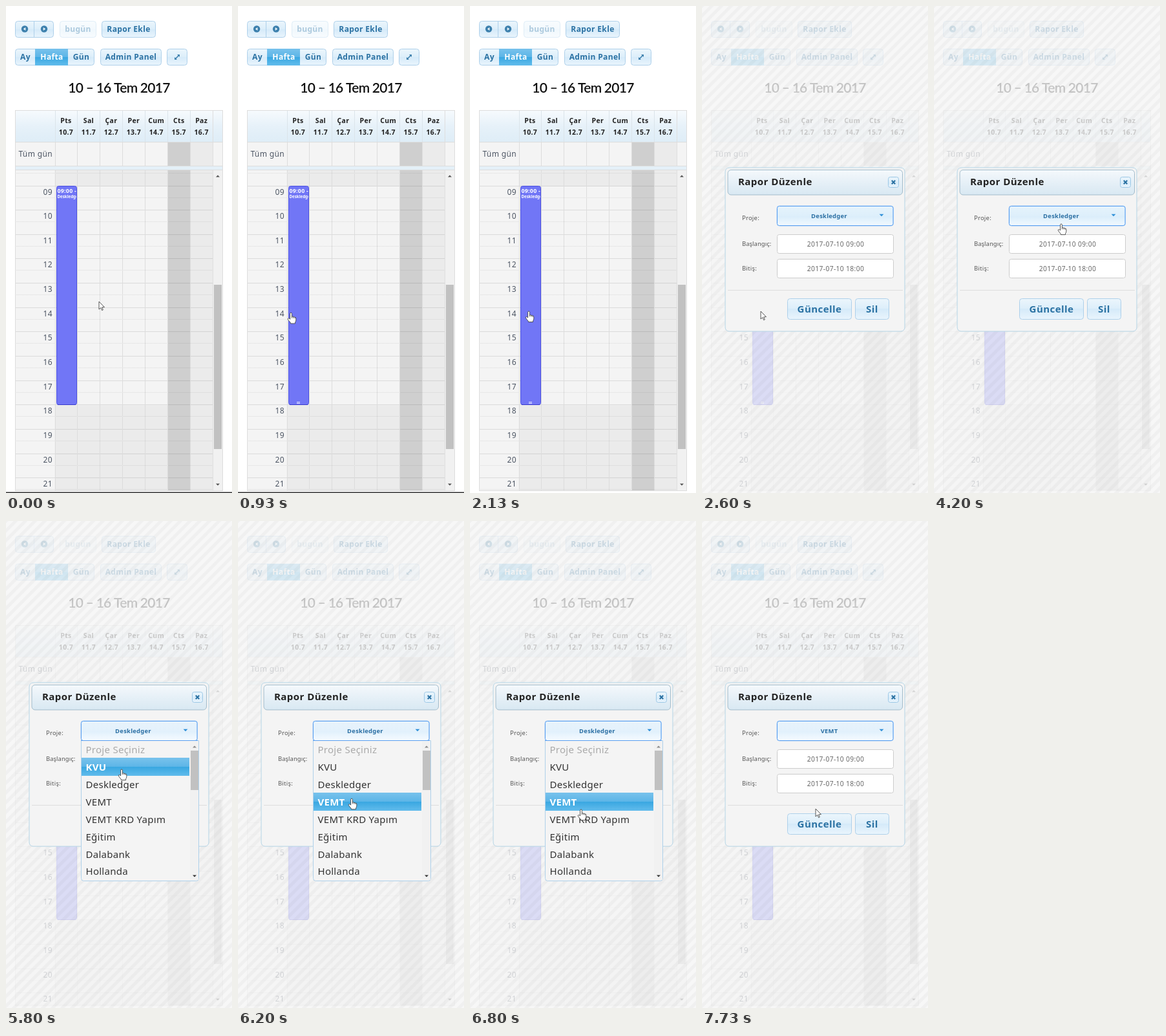
Write an HTML page with a canvas that moves like this. It is 350 px wide and 753 px high and loops after 8 s.

```html
<!DOCTYPE html>
<html lang="tr">
<head>
<meta charset="utf-8">
<title>Haftalık takvim</title>
<style>
html, body { margin: 0; width: 100%; height: 100%; overflow: hidden; background: #fff; }
canvas { display: block; width: 350px; height: 753px; }
</style>
</head>
<body>
<canvas id="stage"></canvas>
<script>
const W = 350, H = 753, LOOP = 8000, TICK = 1000 / 15;
const canvas = document.getElementById('stage');
const ctx = canvas.getContext('2d');
const dpr = window.devicePixelRatio || 1;
canvas.width = W * dpr;
canvas.height = H * dpr;
ctx.scale(dpr, dpr);

const SANS = '"Noto Sans", "Open Sans", sans-serif';
const PROJECT = 'Deskledger';
const ITEMS = ['Proje Seçiniz', 'KVU', PROJECT, 'VEMT', 'VEMT KRD Yapım', 'Eğitim', 'Dalabank', 'Hollanda'];
const DAYS = ['Pts', 'Sal', 'Çar', 'Per', 'Cum', 'Cts', 'Paz'];
const COL0 = 75.5, COLW = 34.95, HOUR = 37.65, NINE = 278.5;
const ROW0 = 340.5, ROWH = 26.85;
const T = { line: 2130, dialog: 2600, leave: 2865, press: 4730, open: 5200, pick: 7730 };

const GLASS = [[0, '#ecf6fc'], [.5, '#dceefa'], [.5, '#d5eaf9'], [1, '#eaf5fd']];
const FOCUS = [[0, '#e6f3fc'], [.5, '#ddeffb'], [.5, '#d9edfb'], [1, '#f2f9fe']];
const PRESS = [[0, '#e8f3fb'], [.5, '#e3f1fc'], [.5, '#e0f0fc'], [1, '#f6fbff']];
const LIT = [[0, '#78c2ec'], [.5, '#5cb5e7'], [.5, '#39a7e1'], [1, '#62bcec']];
const SOFT = [[0, '#f6fafd'], [.5, '#e6f1f9'], [1, '#deedf7']];

// Pointer path: time, x, y
const PATH = [
  [0, 144, 457], [600, 66, 473], [867, 80, 474], [1133, 94, 476], [1267, 94, 476],
  [1467, 91, 472], [2800, 91, 472], [3667, 205, 362], [3733, 206, 346], [4000, 206, 346],
  [4200, 197, 337], [4333, 201, 333], [4400, 201, 333], [4467, 202, 332], [5467, 202, 332],
  [5800, 179, 384], [6333, 175, 437], [6800, 172, 446], [7000, 175, 447.5],
  [7267, 175, 447.5], [7333, 176, 445], [LOOP, 176, 445]
];

function pointer(t) {
  let i = 1;
  while (i < PATH.length - 1 && PATH[i][0] < t) i++;
  const [t0, x0, y0] = PATH[i - 1], [t1, x1, y1] = PATH[i];
  const p = Math.min(1, Math.max(0, (t - t0) / (t1 - t0)));
  const e = p * p * (3 - 2 * p);
  return { x: Math.round(x0 + (x1 - x0) * e), y: y0 + (y1 - y0) * e };
}

const inside = (p, x0, y0, x1, y1) => p.x >= x0 && p.x < x1 && p.y >= y0 && p.y < y1;

function rect(x, y, w, h, fill) {
  ctx.fillStyle = fill;
  ctx.fillRect(x, y, w, h);
}

function line(x0, y0, x1, y1, color, dash = []) {
  ctx.strokeStyle = color;
  ctx.lineWidth = 1;
  ctx.setLineDash(dash);
  ctx.beginPath();
  ctx.moveTo(x0, y0);
  ctx.lineTo(x1, y1);
  ctx.stroke();
  ctx.setLineDash([]);
}

function grad(y, h, stops) {
  const g = ctx.createLinearGradient(0, y, 0, y + h);
  for (const [at, color] of stops) g.addColorStop(at, color);
  return g;
}

function box(x, y, w, h, r, fill, border) {
  ctx.beginPath();
  ctx.roundRect(x + .5, y + .5, w - 1, h - 1, r);
  ctx.fillStyle = Array.isArray(fill) ? grad(y, h, fill) : fill;
  ctx.fill();
  ctx.strokeStyle = border;
  ctx.lineWidth = 1;
  ctx.stroke();
}

// y is the middle of the capitals
function text(s, x, y, size, color, weight = 400, align = 'left', space = .03, family = SANS) {
  ctx.font = `${weight} ${size}px ${family}`;
  ctx.letterSpacing = `${(space * size).toFixed(2)}px`;
  ctx.textAlign = align;
  ctx.fillStyle = color;
  ctx.fillText(s, x, y + size * .36);
}

function poly(points, fill) {
  ctx.beginPath();
  points.forEach(([x, y]) => ctx.lineTo(x, y));
  ctx.closePath();
  ctx.fillStyle = fill;
  ctx.fill();
}

function caret(x, y, w, dir, color) {
  poly([[x - w, y - dir * w / 2], [x + w, y - dir * w / 2], [x, y + dir * w / 2]], color);
}

function button(label, x, y, w, h, size = 12) {
  box(x, y, w, h, 4, GLASS, '#aed0ea');
  text(label, x + w / 2, y + h / 2, size, '#2b72a3', 700, 'center');
}

function roundArrow(x, y, dir) {
  ctx.beginPath();
  ctx.arc(x, y, 5.2, 0, 7);
  ctx.fillStyle = '#3d80ad';
  ctx.fill();
  poly([[x + 2.2 * dir, y], [x - 1.3 * dir, y - 2.6], [x - 1.3 * dir, y + 2.6]], '#eef7fd');
}

function toolbar() {
  box(14, 23, 60, 26, 4, GLASS, '#aed0ea');
  line(43.5, 23, 43.5, 49, '#aed0ea');
  roundArrow(29, 35.5, -1);
  roundArrow(59, 35.5, 1);
  ctx.globalAlpha = .35;
  button('bugün', 83, 23, 57, 26);
  ctx.globalAlpha = 1;
  button('Rapor Ekle', 148, 23, 84, 26);

  box(14, 66, 123, 26, 4, GLASS, '#aed0ea');
  rect(45, 66, 51, 26, grad(66, 26, LIT));
  text('Ay', 30, 79, 12, '#2b72a3', 700, 'center');
  text('Hafta', 71, 79, 12, '#fff', 700, 'center');
  text('Gün', 116.5, 79, 12, '#2b72a3', 700, 'center');
  button('Admin Panel', 146, 66, 95, 26);
  box(249, 66, 32, 26, 4, GLASS, '#aed0ea');
  ctx.lineWidth = 1.6;
  ctx.strokeStyle = '#3d80ad';
  ctx.beginPath();
  ctx.moveTo(262.5, 81.5);
  ctx.lineTo(267.5, 76.5);
  ctx.stroke();
  poly([[265, 75], [269, 75], [269, 79]], '#3d80ad');
  poly([[261, 79], [261, 83], [265, 83]], '#3d80ad');

  text('10 – 16 Tem 2017', 175, 126.5, 21, '#111', 600, 'center', -.035, 'Lato, sans-serif');
}

function calendar() {
  const right = COL0 + 7 * COLW, end = NINE + 9 * HOUR;
  rect(14, 162, 322, 49, grad(162, 49, SOFT));
  rect(14, 211, 322, 538, '#f4f4f4');
  rect(COL0, 254, right - COL0, NINE - 254, '#ebebeb');
  rect(COL0, end, right - COL0, 749 - end, '#ebebeb');
  rect(COL0 + 5 * COLW, 211, COLW, 538, '#cfcfcf');
  rect(COL0 + 6 * COLW, 211, COLW, 538, '#ebebeb');

  for (let h = 8; h <= 21; h++) {
    const y = Math.round(NINE + (h - 9) * HOUR) - .5;
    if (h > 8) {
      line(14, y, right, y, 'rgba(0,0,0,.1)');
      text(String(h).padStart(2, '0'), 72, y + 9.5, 12, '#4c5563', 400, 'right');
    }
    const half = Math.round(y + HOUR / 2) - .5;
    if (half < 749) line(14, half, right, half, 'rgba(0,0,0,.1)', [1, 1]);
  }

  DAYS.forEach((day, i) => {
    const x = COL0 + i * COLW, mid = x + COLW / 2;
    line(Math.round(x) + .5, 162, Math.round(x) + .5, 211, '#dbe4ea');
    line(Math.round(x) + .5, 211, Math.round(x) + .5, 749, '#dcdcdc');
    text(day, mid, 177.5, 10.5, '#222', 700, 'center');
    text(`${10 + i}.7`, mid, 195, 10.5, '#222', 700, 'center');
  });
  line(Math.round(right) + .5, 162, Math.round(right) + .5, 749, '#dedede');

  text('Tüm gün', 72, 228.5, 12, '#4c5563', 400, 'right');
  line(14, 210.5, 336, 210.5, '#dddddd');
  rect(14, 248, 322, 6, '#e4f0f8');
  line(14, 247.5, 336, 247.5, '#dddddd');
  line(14, 253.5, 336, 253.5, '#dddddd');

  rect(321, 254, 14, 495, '#f1f1f1');
  rect(322, 431, 12, 254, '#c1c1c1');
  caret(328, 263, 3, -1, '#505050');
  caret(328, 740, 3, 1, '#505050');
  ctx.strokeStyle = '#dddddd';
  ctx.strokeRect(14.5, 161.5, 321, 588);
}

function eventBlock(handle) {
  box(78, 278, 32, 339, 3, '#7176f6', '#4a4fe2');
  line(80, 616.5, 108, 616.5, '#3a3ccc');
  ctx.save();
  ctx.beginPath();
  ctx.rect(78, 278, 31, 339);
  ctx.clip();
  text('09:00 - 18:00', 79.5, 285.5, 8.8, '#fff', 600);
  text(PROJECT, 79.5, 295, 6.2, '#fff', 700, 'left', 0);
  ctx.restore();
  if (handle) {
    rect(91, 612, 5, 1, '#e8e8ff');
    rect(91, 614, 5, 1, '#e8e8ff');
  }
}

function overlay() {
  rect(0, 0, W, H, 'rgba(246,246,246,.8)');
  ctx.strokeStyle = 'rgba(0,0,0,.028)';
  ctx.lineWidth = 5.3;
  ctx.beginPath();
  for (let x = -H; x < W; x += 15) {
    ctx.moveTo(x - 5, H + 5);
    ctx.lineTo(x + H + 5, -5);
  }
  ctx.stroke();
}

function input(value, y) {
  box(116, y, 181, 30, 3, '#fff', '#cccccc');
  text(value, 207, y + 15, 10.2, '#666', 400, 'center', .04);
}

function dialog(t) {
  box(35.5, 249.5, 279, 254, 6, '#f4f4f4', '#b5d5e6');
  box(39.5, 253, 271.5, 39.5, 5, [[0, '#f5f9fc'], [.5, '#e6f0f7'], [1, '#d8e8f2']], '#a3bccb');
  text('Rapor Düzenle', 56, 272, 15, '#222', 700);
  box(288, 264, 17, 17, 3, GLASS, '#9cc8e6');
  ctx.strokeStyle = '#2b72a3';
  ctx.lineWidth = 2.2;
  ctx.beginPath();
  ctx.moveTo(293.8, 269.8);
  ctx.lineTo(299.2, 275.2);
  ctx.moveTo(299.2, 269.8);
  ctx.lineTo(293.8, 275.2);
  ctx.stroke();

  text('Proje:', 62, 327.5, 9.4, '#555');
  text('Başlangıç:', 62, 367.5, 9.4, '#555', 400, 'left', .01);
  text('Bitiş:', 62, 406, 9.4, '#555');

  box(115.5, 308.5, 181.5, 32, 4, '#c4dff9', '#b4d5f8');
  box(116, 309, 180.5, 31, 3, t < T.press ? FOCUS : PRESS, '#5a9ff0');
  text(t < T.pick ? PROJECT : ITEMS[3], 197, 325, 9.4, '#2b6fa3', 700, 'center');
  caret(278, 323.5, 3.4, 1, '#2f8fd8');

  input('2017-07-10 09:00', 353);
  input('2017-07-10 18:00', 391);
  line(40, 439.5, 311, 439.5, '#dddddd');
  button('Güncelle', 132, 452, 100, 33, 15);
  button('Sil', 237, 452, 53, 33, 15);
}

function menu(p) {
  const active = p.y < ROW0 + ROWH ? 2 : Math.floor((p.y - ROW0) / ROWH);
  box(116, 339, 183, 218, [0, 0, 4, 4], '#f4f4f4', '#aed0ea');
  line(116, 339.5, 297, 339.5, '#5a9ff0');
  ITEMS.forEach((name, i) => {
    const y = ROW0 + i * ROWH, on = i === active;
    if (on) rect(117, Math.round(y) - 1, 167, 28, grad(y - 1, 28, LIT));
    text(name, 123.5, y + 13.5, 15, on ? '#fff' : i ? '#333' : '#aaa', on ? 700 : 400, 'left', .018);
  });
  rect(285, 341, 13, 214, '#f1f1f1');
  rect(286, 355, 12, 61, '#c1c1c1');
  caret(292, 349, 3, -1, '#8a8a8a');
  caret(292, 549, 3, 1, '#303030');
}

const ARROW = new Path2D('M0 0V12L2.8 9.5 4.6 13.6 6.3 12.8 4.6 8.9 8.4 8.6Z');
const HAND = new Path2D('M-1.4 10V1.2Q-1.2 0 0 0T1.4 1.2V5.8Q3.4 5.2 3.8 6.4 5.6 5.8 6 7.1 7.8 6.7 7.8 8.6V11.5Q7.6 13.5 6.5 14.8V16.6H-.7V15.2Q-3 13-4.6 10.3-5.2 8.6-3.6 8.5-2.2 8.8-1.4 10Z');
const KNUCKLES = new Path2D('M1.4 5.8V8.2M3.8 6.4V8.4M6 7.1V8.8');
const BEAM = new Path2D('M-3-8Q0-8 0-7Q0-8 3-8M0-7V7M-3 8Q0 8 0 7Q0 8 3 8');

function cursor(kind, p) {
  ctx.save();
  ctx.translate(p.x, p.y);
  ctx.lineWidth = .9;
  ctx.strokeStyle = '#444';
  ctx.fillStyle = '#fff';
  ctx.lineJoin = 'round';
  if (kind === 'beam') {
    ctx.stroke(BEAM);
  } else {
    const shape = kind === 'hand' ? HAND : ARROW;
    ctx.fill(shape);
    ctx.stroke(shape);
    if (kind === 'hand') ctx.stroke(KNUCKLES);
  }
  ctx.restore();
}

function draw(t) {
  const p = pointer(t);
  const onEvent = inside(p, 78, 278, 110, 617);
  rect(0, 0, W, H, '#fff');
  toolbar();
  calendar();
  eventBlock(onEvent && t < T.leave);
  if (t < T.line) rect(0, 751.5, W, 1.5, '#333');

  let kind = onEvent ? 'hand' : 'arrow';
  if (t >= T.dialog) {
    overlay();
    dialog(t);
    const open = t >= T.open && t < T.pick;
    if (open) menu(p);
    kind = open || inside(p, 116, 309, 297, 340) ? 'hand'
      : inside(p, 116, 353, 297, 383) || inside(p, 116, 391, 297, 421) ? 'beam' : 'arrow';
  }
  cursor(kind, p);
}

const start = performance.now();
function frame() {
  const t = (performance.now() - start) % LOOP;
  draw(Math.floor((t + 4) / TICK) * TICK + 4);
  requestAnimationFrame(frame);
}
frame();
</script>
</body>
</html>
```
